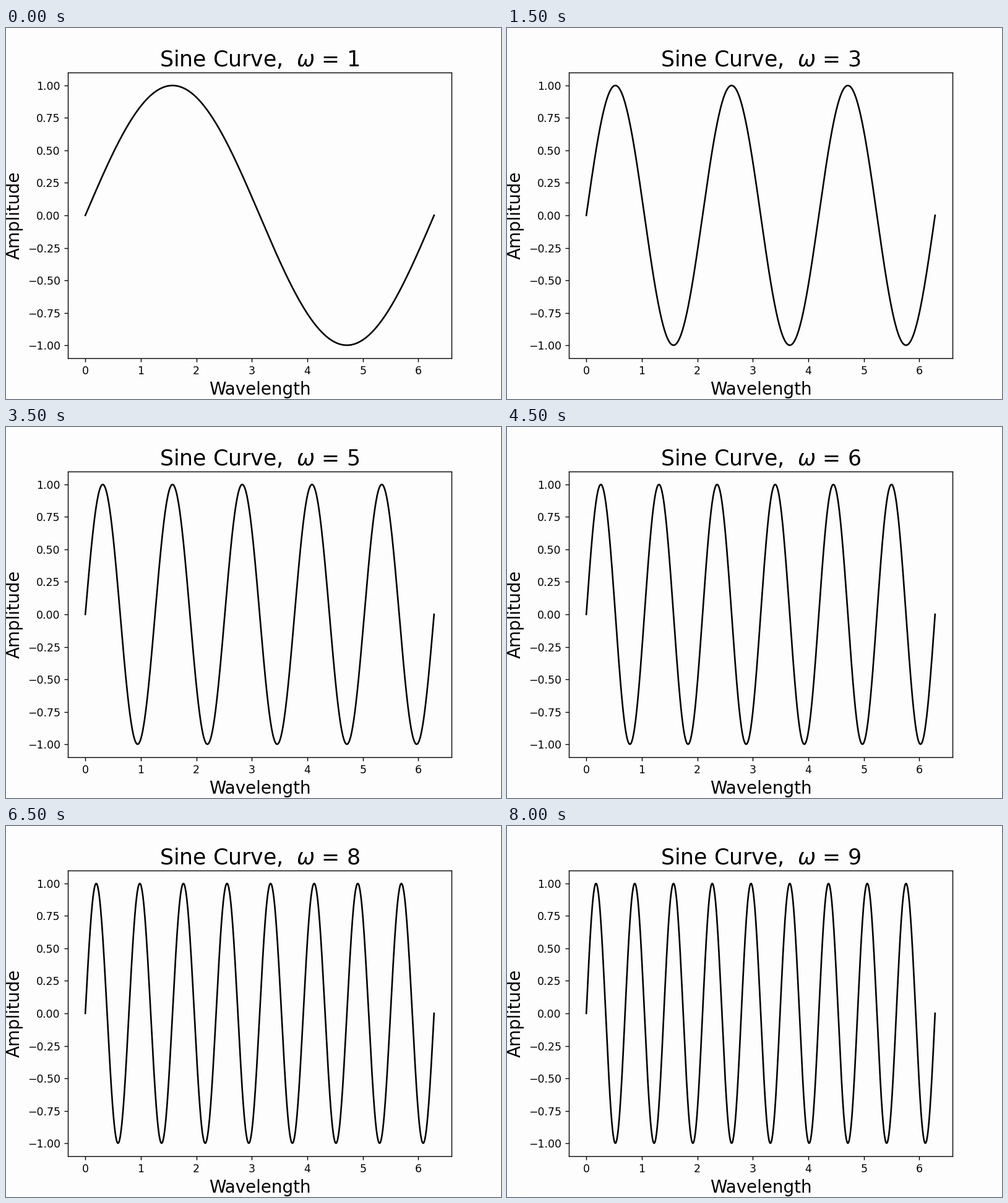
A matplotlib script that plays this animation: 800x600 px, repeating every 8500 ms.

```python
import numpy as np
import matplotlib.pyplot as plt
from matplotlib.animation import FuncAnimation

FRAMES = 17
INTERVAL = 500
PAPER = "#fdfdfd"

plt.rcParams["font.family"] = "DejaVu Sans"

x = np.linspace(0, 2 * np.pi, 1000)

fig, ax = plt.subplots(figsize=(6.4, 4.8), dpi=125, facecolor=PAPER)
fig.subplots_adjust(left=0.125, right=0.9, bottom=0.11, top=0.88)
ax.set_facecolor(PAPER)
line, = ax.plot(x, np.sin(x), color="black", lw=1.5)
ax.set_xlabel("Wavelength", fontsize=16)
ax.set_ylabel("Amplitude", fontsize=16)
title = ax.set_title("", fontsize=20)


def update(i):
    # the first frequency holds for one step, the others for two
    omega = 1 + (i + 1) // 2
    line.set_ydata(np.sin(omega * x))
    title.set_text(rf"Sine Curve,  $\omega$ = {omega}")
    return line, title


anim = FuncAnimation(fig, update, frames=FRAMES, interval=INTERVAL,
                     repeat=True, repeat_delay=0, blit=False)
plt.show()
```
